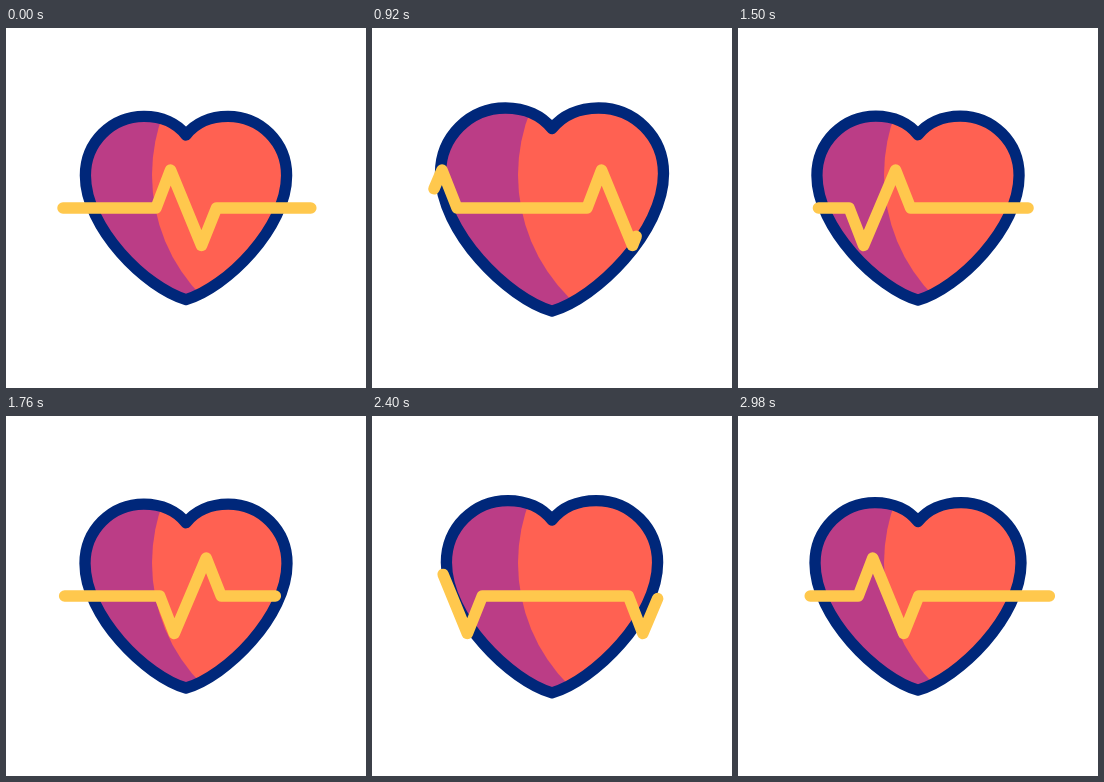
Recreate the animation shown at these times as an HTML page. Size 360 by 360 pixels, loop 3000 ms.

```html
<!DOCTYPE html>
<html lang="en">
<head>
<meta charset="utf-8">
<title>Heartbeat</title>
<style>
  html, body { margin: 0; width: 100%; height: 100%; overflow: hidden; background: #fff; }
  svg { display: block; width: 100vw; height: 100vh; }
  path { fill: none; stroke-linecap: round; stroke-linejoin: round; }
</style>
</head>
<body>
<svg viewBox="0 0 360 360">
  <defs><clipPath id="inside"><path id="clip"/></clipPath></defs>
  <g clip-path="url(#inside)">
    <rect width="360" height="360" fill="#bb3d86"/>
    <circle cx="319" cy="147" r="173" fill="#ff6152"/>
  </g>
  <path id="outline" stroke="#00277a"/>
  <path id="pulse" stroke="#ffc84d" stroke-width="11.5"/>
</svg>
<script>
const LOOP = 3000;
const [clip, outline, pulse] = ['clip', 'outline', 'pulse'].map(id => document.getElementById(id));

// The heart is drawn around the point it swells from.
const HEART = `M0 -59
  C-9 -70.5 -24 -77.6 -42 -77.6 C-74.5 -77.6 -100.6 -51.5 -100.6 -18.5 C-100.6 34 -40 94 0 105.6
  C40 94 100.6 34 100.6 -18.5 C100.6 -51.5 74.5 -77.6 42 -77.6 C24 -77.6 9 -70.5 0 -59Z`;
for (const path of [clip, outline]) path.setAttribute('d', HEART);

// One period of the trace: an up-down spike, then a down-up spike.
const PERIOD = 398;
const spikes = [[0, 180], [14.5, 142], [45.5, 217.5], [60.5, 180],
                [206.5, 180], [221, 217.5], [253, 142], [268, 180]];
const trace = [-2, -1, 0, 1].flatMap(k => spikes.map(([x, y]) => [x + k * PERIOD, y]));
pulse.setAttribute('d', 'M' + trace.join('L'));

const ring = [...spikes, [PERIOD, 180]];
const periodLength = ring.slice(1).reduce(
  (sum, [x, y], i) => sum + Math.hypot(x - ring[i][0], y - ring[i][1]), 0);

// Progress of the trace's tail (with its shift) and of its head.
const times = [0, 500, 920, 1500, 2000, 2400, 2980, 3500];
const tail = [0, .0515, .163, .383, .59, .748, .925, 1];
const head = [0, .07, .207, .4475, .646, .784, .9395, 1];

function smooth(values, t) {
  const slope = i => i === 0 || i === times.length - 1 ? 0
    : (values[i + 1] - values[i - 1]) / (times[i + 1] - times[i - 1]);
  const i = times.findIndex((_, n) => t < times[n + 1]);
  const span = times[i + 1] - times[i];
  const u = (t - times[i]) / span, v = 1 - u;
  return values[i] * v * v * (1 + 2 * u) + values[i + 1] * u * u * (1 + 2 * v)
    + span * u * v * (slope(i) * v - slope(i + 1) * u);
}

function beatScale(t) {
  const beat = 359, peak = 193.5;
  const phase = (t - peak) / beat;
  const distance = Math.abs(phase - Math.round(phase));
  return 1 + .125 * (1 - 2 * distance) ** 2.6;
}

function draw(t) {
  const scale = beatScale(t);
  for (const path of [clip, outline]) {
    path.setAttribute('transform', `translate(180 166) scale(${scale})`);
  }
  outline.setAttribute('stroke-width', 11.3 / scale);

  const shift = smooth(tail, t);
  const start = periodLength * (2 - shift) - 93;
  const end = periodLength * (2 - smooth(head, t)) + 257;
  pulse.setAttribute('transform', `translate(${150 + PERIOD * shift} 0)`);
  pulse.setAttribute('stroke-dasharray', `${end - start} 9999`);
  pulse.setAttribute('stroke-dashoffset', -start);
}

const origin = performance.now();
function tick() {
  draw((performance.now() - origin) % LOOP);
  requestAnimationFrame(tick);
}
draw(0);
requestAnimationFrame(tick);
</script>
</body>
</html>
```
